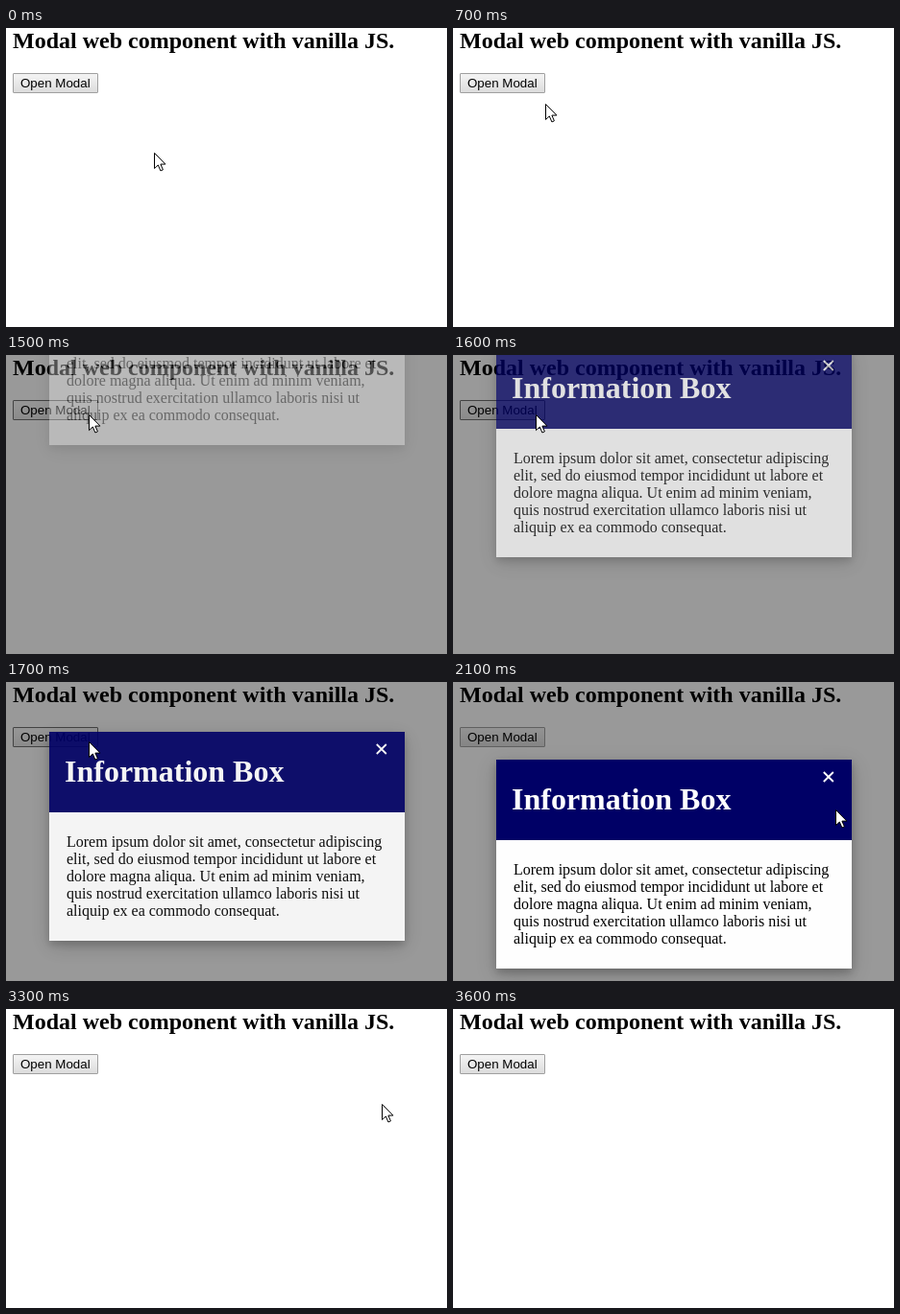
Recreate the animation shown at these times as an HTML page. Size 459 by 312 pixels, loop 4500 ms.

```html
<!DOCTYPE html>
<html lang="en">
<head>
<meta charset="utf-8">
<title>Modal</title>
<style>
  html, body { margin: 0; width: 100%; height: 100%; overflow: hidden; background: #fff; }
  body { position: relative; font-family: "Liberation Serif", "Times New Roman", serif; }
  body div, svg { position: absolute; box-sizing: border-box; }

  /* Text hangs from a strut, so its baseline lies exactly 40px below its top */
  .text { display: flex; align-items: baseline; white-space: pre; line-height: 1; }
  .text::before { content: ""; height: 40px; }

  .title { left: 7px; top: -19px; font-size: 24px; font-weight: bold; }
  #button { left: 7px; top: 47px; width: 89px; height: 21px; border-radius: 1px;
    border: 1px solid #a0a0a0; background: linear-gradient(#f2f2f2 10%, #dcdcdc); }
  #button.hover { border-color: #707070; background: linear-gradient(#f8f8f8 10%, #e6e6e6); }
  .label { left: 15px; top: 22px; font: 13.333px "Liberation Sans", Arial, sans-serif; }

  #modal { inset: 0; background: rgba(0, 0, 0, .4); }
  #panel { left: 45px; width: 370px; height: 218px; background: #fefefe;
    box-shadow: 0 4px 8px rgba(0, 0, 0, .2), 0 6px 20px rgba(0, 0, 0, .19); }
  .header { width: 100%; height: 84px; background: #006; }
  .heading { left: 16px; top: 12px; font-size: 32px; font-weight: bold; color: #fff; }
  .copy { left: 18px; font-size: 16px; }

  .pointer { fill: #fff; stroke: #000; stroke-linejoin: round; }
</style>
</head>
<body>
<div class="text title">Modal web component with vanilla JS.</div>
<div id="button"></div>
<div class="text label">Open Modal</div>

<div id="modal">
  <div id="panel">
    <div class="header"></div>
    <div class="text heading">Information Box</div>
    <svg width="370" height="84">
      <path id="close" d="M340.8 13l10 10m0-10l-10 10" stroke-width="1.8"/>
    </svg>
  </div>
</div>

<svg width="459" height="312" style="left: 0; top: 0">
  <g id="arrow" class="pointer">
    <path d="M.5 1.5V17.6L4.3 14 6.9 20 9.4 18.9 6.9 13.1H11.9Z"/>
  </g>
  <g id="hand" class="pointer">
    <g transform="translate(-.5 -.5)">
      <path d="M0 1.5Q1.5-.5 3 1.5V6Q4.6 5 5.6 6.4 7.3 5.6 8.3 7 10.6 6.4 11 8.5V12L9.5 15.5H1.5L-3.6 9.8Q-4 7.5-2 8.2L0 10Z"/>
      <path d="M3 6v3M5.6 6.6v2.6M8.3 7.2v2.2" stroke-width=".8"/>
    </g>
  </g>
</svg>
<script>
const LOOP = 4500, STEP = 100;
const OPEN_AT = 1400, CLOSE_AT = 3300, HIDE_POINTER_AT = 3600;
const BUTTON_HOVER = [900, 1800], CLOSE_HOVER = [2600, CLOSE_AT];
const SLIDE_TIME = 478, SLIDE_DISTANCE = 300, PANEL_TOP = 81;

// Pointer positions: time, x, y
const pointerPath = [
  [0, 154, 129], [200, 154, 129], [300, 151, 125], [400, 142, 115],
  [500, 127, 101], [600, 110, 88], [700, 96, 78], [800, 93, 71],
  [900, 87, 63], [1000, 86, 61], [1700, 86, 61], [1800, 98, 62],
  [1900, 185, 72], [2000, 318, 114], [2100, 398, 132], [2200, 400, 123],
  [2300, 399, 112], [2400, 397, 105], [2500, 397, 105], [2600, 393, 100],
  [2700, 391, 98], [LOOP, 391, 98]
];

const lines = [
  "Lorem ipsum dolor sit amet, consectetur adipiscing",
  "elit, sed do eiusmod tempor incididunt ut labore et",
  "dolore magna aliqua. Ut enim ad minim veniam,",
  "quis nostrud exercitation ullamco laboris nisi ut",
  "aliquip ex ea commodo consequat."
];

const el = id => document.getElementById(id);
const show = (id, visible) => { el(id).style.display = visible ? "" : "none"; };
const within = (t, [from, to]) => t >= from && t < to;

lines.forEach((line, i) => {
  const row = document.createElement("div");
  row.className = "text copy";
  row.textContent = line;
  row.style.top = `${80 + 18 * i}px`;
  el("panel").append(row);
});

// The standard CSS "ease" curve
function ease(x) {
  if (x <= 0 || x >= 1) return Math.min(1, Math.max(0, x));
  const bezier = (s, a, b) => 3 * s * (1 - s) ** 2 * a + 3 * s * s * (1 - s) * b + s ** 3;
  let low = 0, high = 1;
  for (let i = 0; i < 24; i++) {
    const mid = (low + high) / 2;
    if (bezier(mid, .25, .25) < x) low = mid; else high = mid;
  }
  return bezier(low, .1, 1);
}

function pointerAt(t) {
  const next = pointerPath.findIndex(point => point[0] > t);
  const [t0, x0, y0] = pointerPath[next - 1];
  const [t1, x1, y1] = pointerPath[next];
  const k = (t - t0) / (t1 - t0);
  return [Math.round(x0 + (x1 - x0) * k), Math.round(y0 + (y1 - y0) * k)];
}

function render(ms) {
  const t = Math.floor((ms % LOOP) / STEP) * STEP;
  const closeHover = within(t, CLOSE_HOVER);

  el("button").classList.toggle("hover", within(t, BUTTON_HOVER));
  el("close").setAttribute("stroke", closeHover ? "#000" : "#fff");

  show("modal", within(t, [OPEN_AT, CLOSE_AT]));
  const slide = ease((t - OPEN_AT) / SLIDE_TIME);
  el("panel").style.opacity = slide;
  el("panel").style.top = `${Math.round(PANEL_TOP - (1 - slide) * SLIDE_DISTANCE)}px`;

  const place = `translate(${pointerAt(t)})`;
  el("arrow").setAttribute("transform", place);
  el("hand").setAttribute("transform", place);
  show("arrow", !closeHover && t < HIDE_POINTER_AT);
  show("hand", closeHover);
}

function tick() {
  render(performance.now());
  requestAnimationFrame(tick);
}
tick();
</script>
</body>
</html>
```
